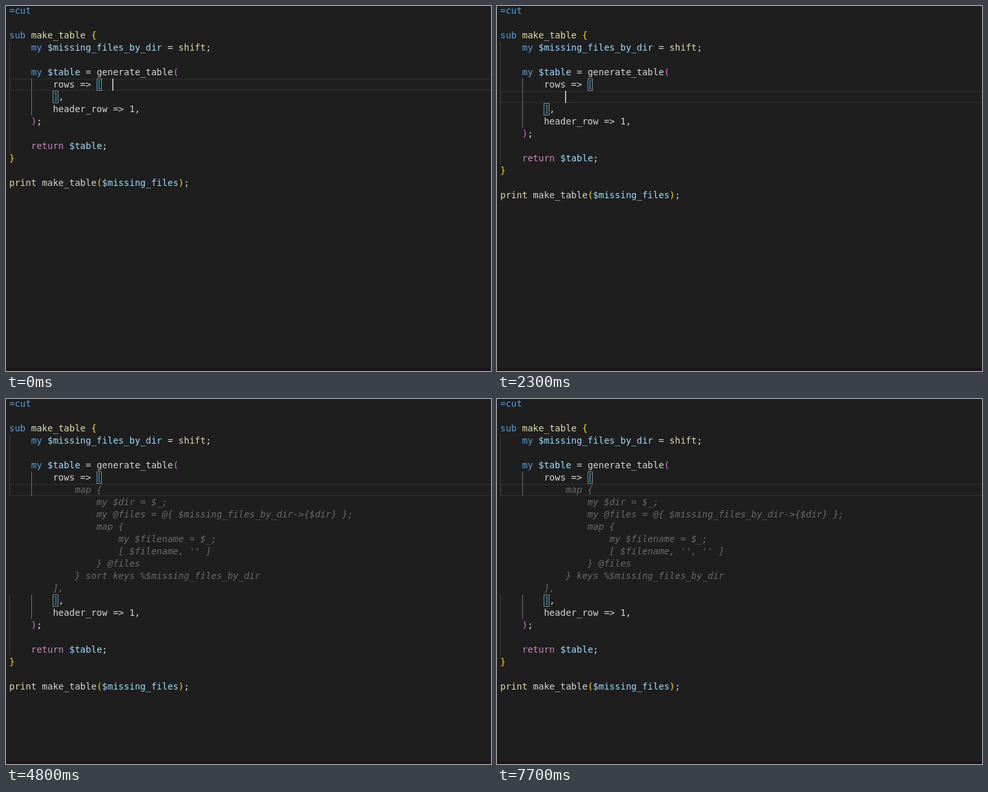
An HTML page for the animation above (8000 ms loop, 749 by 564 pixels).

```html
<!DOCTYPE html>
<html lang="en">
<head>
<meta charset="utf-8">
<title>Editor suggestion</title>
<style>
html, body { margin: 0; width: 100%; height: 100%; overflow: hidden; background: #1e1e1e; }
#stage { position: absolute; inset: 0; overflow: hidden; background: #1e1e1e; color: #d4d4d4;
  font: 14px/19px "DejaVu Sans Mono", monospace; font-variant-ligatures: none; }
#stage div { position: absolute; }
.code { left: 5px; white-space: pre; }
#ghost { color: #6a6a6a; font-style: italic; }
#current { left: 5px; width: 760px; height: 19px; box-sizing: border-box; border: 2px solid #282828; }
.guide { width: 1px; background: #404040; }
.active { background: #707070; }
.match { width: 8.43px; height: 19px; box-sizing: border-box; border: 1px solid #888; background: rgba(0, 100, 0, .1); }
#cursor { width: 2px; height: 19px; background: #aeafad; }
#bar { left: 0; right: 0; top: 560px; height: 4px; background: #1b1419; }
.k { color: #569cd6; } .f { color: #dcdcaa; } .v { color: #9cdcfe; } .r { color: #c586c0; }
.a { color: #ffd700; } .b { color: #da70d6; } .c { color: #179fff; }
</style>
</head>
<body>
<div id="stage">
  <div id="current"></div>
  <div class="guide" id="outer"></div>
  <div class="guide active" id="inner"></div>
  <div class="guide" id="outerTail"></div>
  <div class="guide active" id="innerTail"></div>
  <div class="match" id="open"></div>
  <div class="match" id="close"></div>
  <div class="code" id="head"></div>
  <div class="code" id="ghost"></div>
  <div class="code" id="tail"></div>
  <div id="cursor"></div>
  <div id="bar"></div>
</div>
<script>
const LOOP = 8000, ROW = 19, COL = 8.4287;
const $ = id => document.getElementById(id);
const rowY = row => row * ROW - 2;
const colX = col => 5 + col * COL;

// {style:text} marks a coloured token
const paint = lines => lines.join("\n").replace(/>/g, "&gt;")
  .replace(/~(\w):(.*?)~/g, '<span class="$1">$2</span>');

$("head").innerHTML = paint([
  "~k:=cut~",
  "",
  "~k:sub~ ~f:make_table~ ~a:{~",
  "    ~k:my~ ~v:$missing_files_by_dir~ = ~f:shift~;",
  "",
  "    ~k:my~ ~v:$table~ = generate_table~b:(~",
  "        rows => ~c:[~"
]);
$("tail").innerHTML = paint([
  "        ~c:]~,",
  "        header_row => 1,",
  "    ~b:)~;",
  "",
  "    ~r:return~ ~v:$table~;",
  "~a:}~",
  "",
  "~f:print~ make_table~a:(~~v:$missing_files~~a:)~;"
]);

const suggest = (pair, keys) => [
  "            map {",
  "                my $dir = $_;",
  "                my @files = @{ $missing_files_by_dir->{$dir} };",
  "                map {",
  "                    my $filename = $_;",
  "                    " + pair,
  "                } @files",
  "            } " + keys + " %$missing_files_by_dir",
  "        ],"
].join("\n");

const views = [
  { at: 0, row: 6, col: 19, tail: 7, ghost: "" },
  { at: 1100, row: 7, col: 12, tail: 8, ghost: "" },
  { at: 2600, row: 7, col: 12, tail: 16, ghost: suggest("[ $filename, '' ]", "sort keys") },
  { at: 4900, row: 7, col: 12, tail: 16, ghost: suggest("$filename => ''", "sort keys") },
  { at: 6900, row: 7, col: 12, tail: 16, ghost: suggest("[ $filename, '', '' ]", "keys") }
];
// The cursor starts lit and toggles at each time
const blinks = [300, 800, 1800, 2300, 2800, 3300, 3800, 4300, 4800, 5200, 5700, 6200, 6700, 7200, 7700];

function place(id, left, row, rows) {
  const s = $(id).style;
  if (left !== null) s.left = left + "px";
  s.top = rowY(row) + "px";
  if (rows) s.height = rows * ROW + "px";
}

function show(v) {
  place("current", null, v.row);
  place("outer", 5, 3, v.row - 2);
  place("inner", 39, 6, v.row - 5);
  place("outerTail", 5, v.tail, 5);
  place("innerTail", 39, v.tail, 2);
  place("open", colX(16), 6);
  place("close", colX(8), v.tail);
  place("head", null, 0);
  place("ghost", null, 7);
  place("tail", null, v.tail);
  place("cursor", Math.floor(colX(v.col)) - 1, v.row);
  $("ghost").textContent = v.ghost;
}

let shown = null;
const start = performance.now();
function tick() {
  const t = Math.max(0, performance.now() - start) % LOOP;
  const view = views.filter(v => v.at <= t).pop();
  if (view !== shown) show(shown = view);
  const lit = blinks.filter(b => b <= t).length % 2 === 0;
  $("cursor").style.visibility = lit ? "visible" : "hidden";
  requestAnimationFrame(tick);
}
tick();
</script>
</body>
</html>
```
